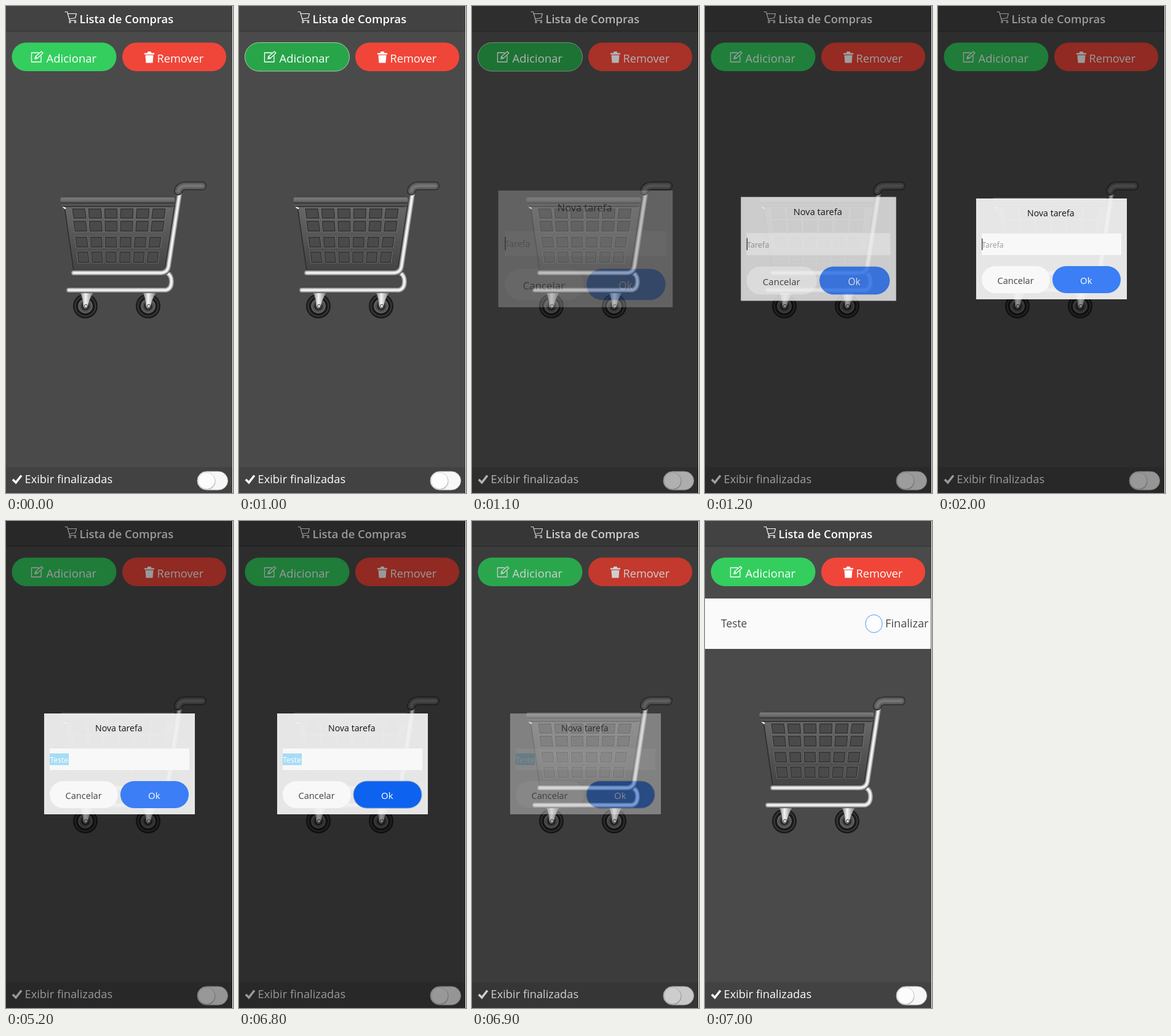
Write an HTML page that moves like this. It is 369 px wide and 792 px high and loops after 8000 ms.

```html
<!DOCTYPE html>
<html lang="pt">
<head>
<meta charset="utf-8">
<title>Lista de Compras</title>
<style>
  html, body { margin: 0; width: 100%; height: 100%; overflow: hidden; background: #fff; }
  svg { display: block; }
  text { font-family: "Open Sans", "Noto Sans", sans-serif; fill: #fff; white-space: pre; }
  .label { font-weight: 500; }
  .line { fill: none; stroke: #fff; stroke-linecap: round; stroke-linejoin: round; }
  .tube { fill: none; stroke-linecap: round; stroke-linejoin: round; }
</style>
</head>
<body>
<svg width="369" height="792" viewBox="0 0 369 792">
  <defs>
    <linearGradient id="rim" x2="0" y2="1">
      <stop offset="0" stop-color="#333"/><stop offset=".2" stop-color="#7a7a7a"/>
      <stop offset=".5" stop-color="#666"/><stop offset=".62" stop-color="#363636"/>
      <stop offset=".8" stop-color="#5c5c5c"/><stop offset="1" stop-color="#2c2c2c"/>
    </linearGradient>
    <linearGradient id="basketFill" x2="0" y2="1">
      <stop offset="0" stop-color="#676767"/><stop offset="1" stop-color="#434343"/>
    </linearGradient>
    <linearGradient id="fork">
      <stop offset="0" stop-color="#777"/><stop offset=".4" stop-color="#f4f4f4"/>
      <stop offset="1" stop-color="#6d6d6d"/>
    </linearGradient>
  </defs>

  <rect width="368" height="792" fill="#4a4a4a"/>
  <rect width="368" height="41" fill="#424242"/>
  <rect y="40.5" width="368" height="1" fill="#303030"/>

  <g class="line" stroke-width="1.1">
    <path d="M96 9.500h3.500l4 14h10M100.500 12.500h14l-2 7-10 1.500"/>
    <circle cx="104" cy="26" r="1.300"/><circle cx="112.500" cy="26" r="1.300"/>
  </g>
  <text x="119.5" y="27.7" font-size="18.4" font-weight="600">Lista de Compras</text>

  <rect id="add" x="9.500" y="59.500" width="170" height="46.500" rx="23.200"/>
  <g class="line" stroke-width="1.3">
    <path d="M53 76H41.500v15h15.500V81"/>
    <path d="M47 86l1-4 9.500-8 2.500 2.500-9 8.500zM48 82l3 3"/>
  </g>
  <text class="label" x="65.500" y="92" font-size="18.5">Adicionar</text>

  <rect x="189" y="59.500" width="169" height="46.500" rx="23.200" fill="#f04639"/>
  <path d="M225 76.500h4.500l1-2.500h5l1 2.500h4.500v2.500h-16zM226.500 80h13l-1 12.500h-11z" fill="#fff"/>
  <text class="label" x="245.500" y="92" font-size="18.200">Remover</text>

  <g id="row">
    <rect y="126" width="367" height="82" fill="#fafafa"/>
    <text x="26" y="173" font-size="17.4" style="fill:#484848">Teste</text>
    <rect x="261" y="152.500" width="27" height="29" rx="13.500" fill="#fdfdfd" stroke="#5290f4"/>
    <text x="293" y="173" font-size="18.2" style="fill:#484848">Finalizar</text>
  </g>

  <g id="cart"></g>

  <rect y="750" width="368" height="42" fill="#424242"/>
  <path class="line" stroke-width="3.6" d="M11 770l5 5 9-11.500" style="stroke-linecap:butt;stroke-linejoin:miter"/>
  <text class="label" x="30.500" y="776.300" font-size="18.3">Exibir finalizadas</text>
  <rect x="311" y="757" width="49.500" height="30" rx="15" fill="#f7f7f7" stroke="#c4c4c4"/>
  <circle cx="326.500" cy="772.800" r="14" fill="#b5b5b5"/>
  <circle cx="326" cy="772" r="13.600" fill="#fcfcfc" stroke="#d5d5d5" stroke-width=".8"/>

  <rect id="mask" width="368" height="792"/>

  <g id="dialog">
    <rect x="62" y="313" width="245" height="164" fill="#fbfbfb" fill-opacity=".9"/>
    <text x="145" y="342" font-size="14.200" font-weight="500" style="fill:#111">Nova tarefa</text>
    <rect x="71" y="370" width="227" height="35" fill="#f8f8f8"/>
    <rect id="selection" x="71" y="378" width="31" height="19" fill="#a6dcf6"/>
    <text id="field" x="71.300" y="392.700" font-size="12.300"></text>
    <rect id="caret" y="378" width="1.200" height="19" fill="#222"/>
    <rect x="71" y="423" width="111" height="44" rx="22" fill="#f8f8f8"/>
    <text x="96.500" y="452" font-size="14.600" style="fill:#444">Cancelar</text>
    <rect id="ok" x="186" y="423" width="111" height="44" rx="22"/>
    <text x="231" y="452" font-size="15" font-weight="500">Ok</text>
  </g>
</svg>
<script>
const LOOP = 8000;
const $ = id => document.getElementById(id);
const set = (id, attrs) => {
  for (const [name, value] of Object.entries(attrs)) $(id).setAttribute(name, value);
};
const show = (id, visible) => set(id, { display: visible ? "inline" : "none" });

// Stacked strokes, from [color, width] pairs, shade a tube from edge to core.
const tube = (d, layers) => layers
  .map(([color, width]) => `<path class="tube" d="${d}" stroke="${color}" stroke-width="${width}"/>`)
  .join("");
const chrome = [["#444", 9.5], ["#8c8c8c", 8], ["#c0c0c0", 5.5], ["#f4f4f4", 3]];
const rubber = [["#2c2c2c", 14], ["#5c5c5c", 11], ["#747474", 5]];

const wheel = x => `<g transform="translate(${x} 488)">
  <circle r="20" fill="#1a1a1a"/>
  <circle r="16.500" fill="none" stroke="#3c3c3c" stroke-width="2"/>
  <circle r="11" fill="#505050" stroke="#6a6a6a" stroke-width="1.500"/>
  <circle r="7" fill="#2a2a2a"/>
  <path d="M-9-22H14Q8-16 5-3Q4 4 0 4Q-4 3-4-5Q-5-16-9-22Z" fill="url(#fork)" stroke="#444" stroke-width=".7"/>
  <circle cx="1" r="2.600" fill="#ddd" stroke="#444"/></g>`;

// Each row: top, height, left edge, right edge.
function basketHoles() {
  const rows = [[330, 15, 108, 259], [350, 16, 110, 257], [376, 16, 113, 252], [400, 17, 116, 248]];
  let out = "";
  for (const [y, h, left, right] of rows) {
    const pitch = (right - left + 6) / 6, w = pitch - 6;
    for (let i = 0; i < 6; i++) {
      const skew = (2.5 - i) * .8;
      const x = left + i * pitch;
      const d = `M${x} ${y}h${w}l${skew} ${h}h${-w}z`;
      out += `<path d="${d}" fill="#4a4a4a" stroke="#757575" stroke-width="3.200" stroke-linejoin="round"/>` +
             `<path d="${d}" fill="#4a4a4a" stroke="#303030" stroke-width="1.300" stroke-linejoin="round"/>`;
    }
  }
  return out;
}

function drawCart() {
  $("cart").innerHTML =
    wheel(129) + wheel(231) +
    tube("M102 462H260Q269 460 269 448Q269 438 262 434", chrome) +
    `<path d="M95 325H274L258 431H110Z" fill="url(#basketFill)" stroke="#2c2c2c" stroke-width="1.500"/>` +
    basketHoles() +
    tube("M282 306L264 424Q262 434 251 434H110", chrome) +
    `<path d="M92 319Q90 325 96 329" class="line" stroke-width="2.500"/>
     <rect x="88.500" y="309" width="186" height="18" rx="6" fill="url(#rim)"/>` +
    tube("M280 301Q282 293 292 292.500H319", rubber);
}

// [start, mask opacity, dialog opacity, dialog scale]
const stages = [
  [0, 0, 0, 1], [1100, .3, .26, 1.157], [1200, .38, .86, 1.03], [1300, .4, 1, 1],
  [6900, .19, .4, 1], [7000, 0, 0, 1],
];
const keyTimes = [2700, 2900, 3000, 3100, 3200];
const caretToggles = [1600, 2000, 2500, 2700, 3700, 4100, 4600, 5000, 5200];

function render(t) {
  const [, dim, opacity, scale] = stages.findLast(stage => t >= stage[0]);
  const addPressed = t >= 1000 && t < 1200;
  const okPressed = t >= 6800 && t < 7000;
  const selected = t >= 5200;
  const passed = times => times.filter(time => t >= time).length;
  const typed = "Teste".slice(0, passed(keyTimes));

  set("add", { fill: addPressed ? "#28a549" : "#34ce5f", stroke: addPressed ? "#a9c9b0" : "none" });
  set("ok", { fill: okPressed ? "#0d62f0" : "#3b7ef5", stroke: okPressed ? "#8fa0bd" : "none" });
  set("mask", { opacity: dim });
  set("dialog", {
    opacity,
    transform: `translate(184.500 395) scale(${scale}) translate(-184.500 -395)`,
  });
  show("dialog", opacity > 0);
  show("row", t >= 7000);

  const field = $("field");
  field.textContent = typed || "Tarefa";
  field.style.fill = selected ? "#fff" : typed ? "#222" : "#9a9a9a";
  set("caret", { x: 71.2 + (typed ? field.getComputedTextLength() : 0) });
  show("caret", !selected && passed(caretToggles) % 2 === 0);
  show("selection", selected);
}

drawCart();
const start = performance.now();
function tick() {
  render((performance.now() - start) % LOOP);
  requestAnimationFrame(tick);
}
tick();
</script>
</body>
</html>
```
